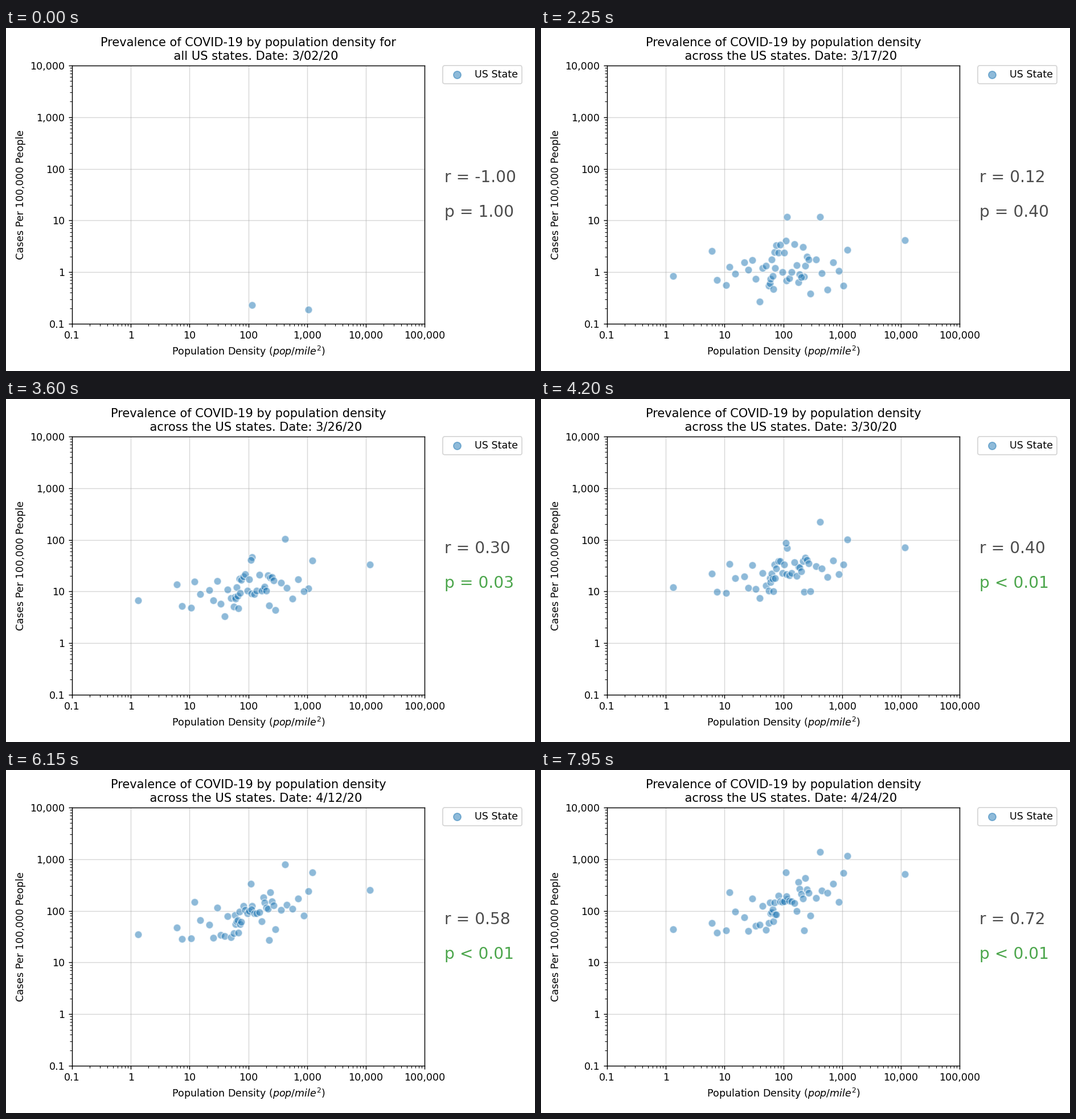
Recreate the animation shown at these times as a matplotlib script. Size 929x603 px, loop 8 s.

```python
import math

import matplotlib.pyplot as plt
import numpy as np
from matplotlib.animation import FuncAnimation
from matplotlib.markers import TICKDOWN, TICKLEFT

W, H, DPI = 929, 603, 128
LEFT, RIGHT, TOP, BOTTOM = 116, 735.2, 66, 520
X_DECADE, Y_DECADE = (RIGHT - LEFT) / 6, (BOTTOM - TOP) / 5
INTERVAL, FRAMES, FRAMES_PER_DAY = 50, 160, 3
EARLY, LAST = 15, 53  # days that anchor each state's offset from the trend

plt.rcParams.update({"font.family": "DejaVu Sans", "font.size": 9.85,
                     "mathtext.fontset": "dejavusans"})

# National trend: median height in stage pixels and correlation.
KEY_DAYS = [0, 7, EARLY, 20, 28, 41, LAST]
MEDIAN = [600, 535, 436, 375, 315, 262, 242]
KEY_R = [-1, -0.02, 0.12, 0.21, 0.40, 0.58, 0.72]

# Outlying states: x, then offset from the trend at the start, early and last day.
OUTLIERS = np.array([
    (232, 0, -12, -31),      # AK
    (299.5, 0, -52, -18),    # WY
    (330.5, 0, -22, -61),    # SD
    (432, -113, -104, -12),  # WA
    (429.6, 0, -62, -60),    # LA
    (451.5, 0, 13, -35),     # MI
    (461.6, 0, 3, 53),       # HI
    (489.5, -60, -100, -75), # NY
    (530.5, -105, 23, -23),  # RI
    (538, -40, -39, -50),    # NJ
    (639, -60, -50, 18),     # DC
])

# The other states: a dense middle with thin tails, scattered around the trend.
COUNT = 40
rng = np.random.default_rng(7)
cloud_x = np.interp(np.arange(COUNT), [0, 3, 7, 10, 18, 23, 28, 34, 39],
                    [309, 357, 384, 400, 413, 431, 454, 473, 523])
cloud_early = np.clip(rng.normal(0, 32, COUNT), -55, 75)
cloud_last = 0.3 * cloud_early + np.clip(rng.normal(0, 17, COUNT), -35, 35)
cloud = np.column_stack([cloud_x, cloud_early, cloud_early, cloud_last])

x, at_start, at_early, at_last = np.vstack([OUTLIERS, cloud]).T


def heights_on(day, r):
    tilt = 0.5 * max(r, 0)
    trend = np.interp(day, KEY_DAYS, MEDIAN) - tilt * (x - 425)
    if day < EARLY:
        return trend + at_start + (at_early - at_start) * day / EARLY
    ease_out = 1 - ((LAST - day) / (LAST - EARLY)) ** 2
    return trend + at_early + (at_last - at_early) * ease_out


def p_value(r, n):
    """Two-sided p by Fisher's z transform."""
    if n <= 3:
        return 1.0
    return math.erfc(abs(math.atanh(r)) * math.sqrt((n - 3) / 2))


def title_on(day):
    month, date = (3, day + 2) if day < 30 else (4, day - 29)
    tail, scope = (" for", "all US") if day == 0 else ("", "across the US")
    return (f"Prevalence of COVID-19 by population density{tail}\n"
            f"    {scope} states. Date: {month}/{date:02d}/20")


fig = plt.figure(figsize=(W / DPI, H / DPI), dpi=DPI, facecolor="white")
ax = fig.add_axes([LEFT / W, 1 - BOTTOM / H, (RIGHT - LEFT) / W, (BOTTOM - TOP) / H])
ax.set_xlim(LEFT, RIGHT)
ax.set_ylim(BOTTOM, TOP)
ax.set_axisbelow(True)
ax.grid(color="#b0b0b0", alpha=0.5, lw=0.8)

labels = ["0.1"] + [f"{10 ** k:,}" for k in range(6)]
ax.set_xticks(LEFT + X_DECADE * np.arange(7), labels)
ax.set_yticks(BOTTOM - Y_DECADE * np.arange(6), labels[:6])
ax.set_xlabel("Population Density ($pop/mile^2$)", labelpad=3.7)
ax.set_ylabel("Cases Per 100,000 People")

# Logarithmic minor ticks.
minor = np.add.outer(np.arange(6), np.log10(np.arange(2, 10))).ravel()
minor_y = minor[minor < 5]
tick_style = dict(ls="", color="black", ms=2, mew=0.6, clip_on=False)
ax.plot(LEFT + X_DECADE * minor, np.full(minor.size, BOTTOM), marker=TICKDOWN, **tick_style)
ax.plot(np.full(minor_y.size, LEFT), BOTTOM - Y_DECADE * minor_y, marker=TICKLEFT, **tick_style)

ax.scatter([], [], s=54, color="tab:blue", alpha=0.5, label="US State")
ax.legend(bbox_to_anchor=(1.0515, 1), loc="upper left", borderaxespad=0)
points = ax.scatter(x, heights_on(0, 0), s=54, color="tab:blue", edgecolor="white",
                    lw=1, alpha=0.5, zorder=2)

title = ax.set_title("", fontsize=11.82)
r_text = fig.text(770.3 / W, 1 - 271 / H, "", fontsize=15.8, alpha=0.7)
p_text = fig.text(770.3 / W, 1 - 332 / H, "", fontsize=15.8, alpha=0.7)


def update(frame):
    day = frame // FRAMES_PER_DAY
    r = np.interp(day, KEY_DAYS, KEY_R)
    p = p_value(r, np.interp(day, [0, 7, 11], [2, 18, 51]))
    points.set_offsets(np.column_stack([x, heights_on(day, r)]))
    title.set_text(title_on(day))
    r_text.set_text(f"r = {r:.2f}")
    p_text.set_text("p < 0.01" if p < 0.01 else f"p = {p:.2f}")
    p_text.set_color("green" if p < 0.05 else "black")
    return points, title, r_text, p_text


anim = FuncAnimation(fig, update, frames=FRAMES, interval=INTERVAL,
                     repeat=True, repeat_delay=0, blit=False)
plt.show()
```
